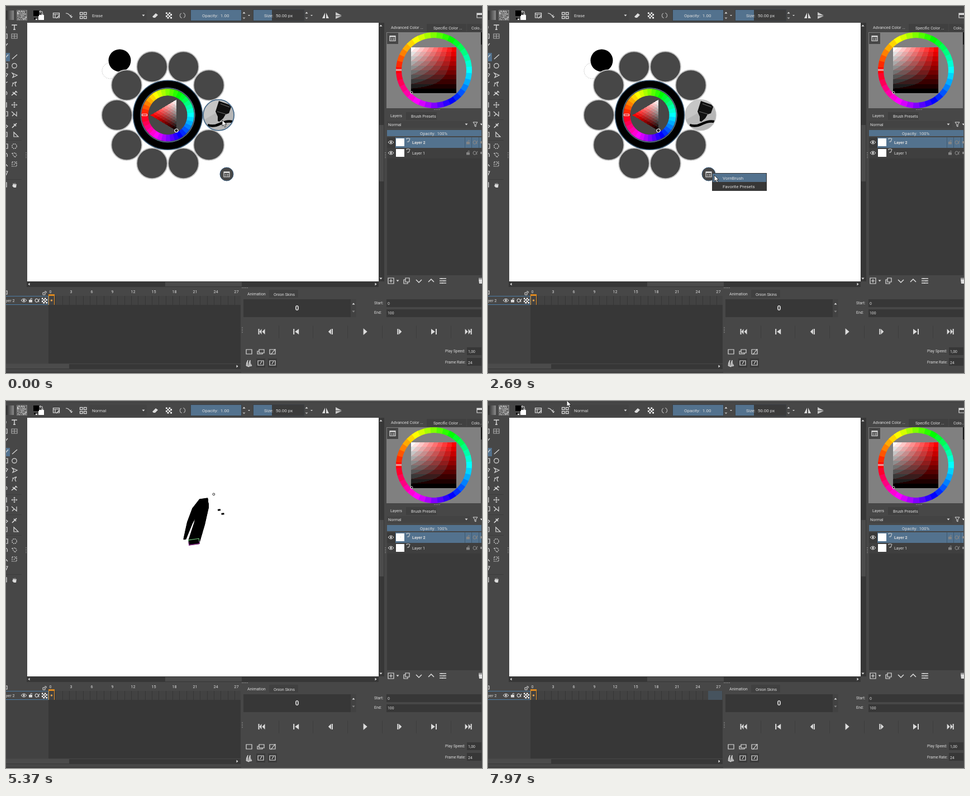
Recreate the animation shown at these times as an HTML page with a canvas. Size 852 by 657 pixels, loop 8000 ms.

```html
<!DOCTYPE html>
<html lang="en">
<head>
<meta charset="utf-8">
<title>Brush palette demo</title>
<style>
html, body { margin: 0; width: 100%; height: 100%; overflow: hidden; background: #474747 }
canvas { display: block }
</style>
</head>
<body>
<canvas id="stage" width="852" height="657"></canvas>
<script>
const W = 852, H = 657, LOOP = 8000, TAU = Math.PI * 2;
const PANEL = '#474747', DARK = '#373737', BLUE = '#53728e', LIGHT = '#dcdcdc', DIM = '#858585';
const stage = document.getElementById('stage').getContext('2d');
let g = stage;

function layer(draw) {
  const canvas = document.createElement('canvas');
  canvas.width = W;
  canvas.height = H;
  g = canvas.getContext('2d');
  draw();
  g = stage;
  return canvas;
}

// Drawing helpers
function box(x, y, w, h, color) {
  g.fillStyle = color;
  g.fillRect(x, y, w, h);
}
function frame(x, y, w, h, color, width = 1) {
  g.strokeStyle = color;
  g.lineWidth = width;
  g.strokeRect(x, y, w, h);
}
function disc(x, y, r, fill, stroke, width = 1) {
  g.beginPath();
  g.arc(x, y, r, 0, TAU);
  if (fill) { g.fillStyle = fill; g.fill(); }
  if (stroke) { g.strokeStyle = stroke; g.lineWidth = width; g.stroke(); }
}
function shape(d, x, y, fill, stroke, width = 1.2) {
  const path = new Path2D(d);
  g.save();
  g.translate(x, y);
  if (fill) { g.fillStyle = fill; g.fill(path); }
  if (stroke) { g.strokeStyle = stroke; g.lineWidth = width; g.stroke(path); }
  g.restore();
}
const solid = (d, x, y, color = LIGHT) => shape(d, x, y, color);
const outline = (d, x, y, color = LIGHT, width) => shape(d, x, y, null, color, width);
function text(str, x, y, size = 7.2, { color = LIGHT, align = 'left', weight = 400 } = {}) {
  g.font = `${weight} ${size}px Roboto, sans-serif`;
  g.fillStyle = color;
  g.textAlign = align;
  g.fillText(str, x, y);
}

// Icons, all centred on their position
const UP = 'M-2.5 1.5H2.5L0-1.5Z', DOWN = 'M-2.5-1.5H2.5L0 1.5Z';
const LEFT = 'M1.5-2.5V2.5L-1.5 0Z', RIGHT = 'M-1.5-2.5V2.5L1.5 0Z';
const SQUARE = 'M-5-4H5V4H-5Z';
function listIcon(x, y) {
  outline('M-5-4.5H5V4.5H-5Z', x, y);
  box(x - 5, y - 5, 10, 2.5, LIGHT);
  outline('M-3 0H-1M0 0H3.5M-3 2.5H-1M0 2.5H3.5', x, y);
}
function checker(x, y, size) {
  const cell = size / 4;
  for (let i = 0; i < 16; i++) {
    const col = i % 4, row = i >> 2;
    box(x - size / 2 + col * cell, y - size / 2 + row * cell, cell, cell, (col + row) % 2 ? '#555' : '#fff');
  }
}
function eye(x, y) {
  shape('M-5 0Q0-6 5 0Q0 6-5 0Z', x, y, null, LIGHT, 1);
  disc(x, y, 1.8, LIGHT);
}
function lock(x, y, color) {
  box(x - 3, y - 1, 6, 4.5, color);
  outline('M0-1V-3Q2-5 3-2', x, y, color, 1);
}
const alpha = (x, y, color) => outline('M4-3Q1 4-2 3Q-4 2-4 0Q-3-3-1-3Q1-3 3 3', x, y, color, 1.1);

// Colour selectors: hue runs clockwise from red at the left
function hueRing(x, y, inner, outer, count) {
  const step = TAU / count;
  for (let i = 0; i < count; i++) {
    const mid = Math.PI + i * step;
    g.beginPath();
    g.arc(x, y, (inner + outer) / 2, mid - step / 2 - .01, mid + step / 2 + .01);
    g.strokeStyle = `hsl(${i * 360 / count} 100% 50%)`;
    g.lineWidth = outer - inner;
    g.stroke();
  }
}
// Ten-level shades of red; each channel is quantized on its own
const level = n => 255 * Math.min(9, Math.floor(n * 10)) / 9;
function shadePixel(x, y, red, low) {
  box(x, y, 1, 1, `rgb(${level(red)} ${level(low)} ${level(low)})`);
}
function shadeSquare(x, y, w, h) {
  for (let py = 0; py < h; py++) for (let px = 0; px < w; px++) {
    const value = 1 - (py + .5) / h;
    shadePixel(x + px, y + py, value, value * (1 - px / w));
  }
}
function shadeTriangle(x, y, w, h) {
  for (let px = 0; px < w; px++) {
    const half = h / 2 * px / w;
    for (let py = -Math.floor(half); py <= half; py++) {
      const hue = 1 - px / w;
      const white = (1 - hue) * (half ? .5 - py / half / 2 : .5);
      shadePixel(x + px, y + py, hue + white, white);
    }
  }
}

function drawToolbar() {
  const fade = g.createLinearGradient(0, 0, 14, 0);
  fade.addColorStop(0, '#2a2a2a');
  fade.addColorStop(1, '#8a8a8a');
  box(0, 8, 14, 17, fade);
  let seed = 7;
  for (let i = 0; i < 324; i++) {
    seed = seed * 16807 % 2147483647;
    const v = 50 + seed % 160;
    box(20 + i % 18, 8 + Math.floor(i / 18), 1, 1, `rgb(${v} ${v} ${v})`);
  }
  frame(19.5, 7.5, 18, 18, '#777');
  box(58, 16, 10, 9, '#fff');
  box(49, 8, 10, 10, '#000');
  outline('M-3-3H2V3M0 1L2 3L4 1M-1-5L-3-3L-1-1', 63, 13, LIGHT, 1);
  box(50, 21, 3, 3, '#111');
  box(53, 23, 3, 2, '#eee');

  outline('M-5.5-4.5H5.5V4H-5.5ZM-5.5-2H5.5M-2-2V4M0 5L5 0', 90, 17);
  outline('M-6-3Q-1-3 2 2L4 0', 113, 16);
  solid(DOWN, 117, 20);
  for (const [x, y] of [[132, 11], [139, 11], [132, 18], [139, 18]]) frame(x + .5, y + .5, 4.5, 4, LIGHT, 1.3);
  box(149, 7, 103, 19, '#434343');
  solid(DOWN, 246, 17);
  solid('M-5 2L1-4L5-1L0 4H-3Z', 267, 17);
  checker(291.5, 17, 11);
  outline('M-2-4A4.5 4.5 0 0 0-1 4.5M2 4A4.5 4.5 0 0 0 1-4.5', 316, 17, '#aaa');

  box(330, 6, 91, 21, BLUE);
  text('Opacity:  1.00', 351, 20, 8);
  box(442, 6, 91, 21, '#3b3b3b');
  box(442, 6, 34, 21, BLUE);
  text('Size:  50.00 px', 462, 20, 8);
  for (const x of [330, 442]) frame(x + .5, 6.5, 91, 20, '#3a3f44');
  for (const x of [426, 538]) {
    solid(UP, x, 12);
    solid(DOWN, x, 22, '#aaa');
    solid('M-2-1H2L0 1Z', x + 9, 17);
  }
  solid('M-1-5V5H-6ZM1-5L6 5H1Z', 572, 17);
  solid('M-5-6L6 0H-5ZM-5 1H6L-5 6Z', 595, 17, '#c8c8c8');
  outline(SQUARE, 848, 17);
  box(843, 13, 9, 3, LIGHT);
}

function drawToolbox() {
  box(0, 84, 7, 15, BLUE);
  for (const y of [167, 203, 240, 310]) box(0, y, 28, 1, '#3d3d3d');
  outline('M-4-3V-4H4V-3M0-4V4M-2 4H2', 15, 38, LIGHT, 1.4);
  outline('M-5-4H5V4H-5ZM0-4V4M-5 0H5', 15, 54, '#aaa');
  outline('M-4 4L5-4', 15, 91);
  disc(15, 107, 4.2, null, LIGHT, 1.2);
  outline('M-4-4L5 0L-3 4L-1 0Z', 15, 124);
  outline('M-4 4Q-3-4 4-4M4-4Q-1 0 3 4M-4-2H0', 15, 140);
  outline('M-5 4L3-3M-3-2L1 2M2-4L5-1M0 0L4 4', 15, 156, LIGHT, 1.5);
  outline('M0-5V5M-5 0H5M-1.5-3.5L0-5L1.5-3.5M-1.5 3.5L0 5L1.5 3.5M-3.5-1.5L-5 0L-3.5 1.5M3.5-1.5L5 0L3.5 1.5', 15, 177, LIGHT, 1);
  outline('M-5-4L4 4V-4M-4 4L0 0', 15, 193);
  outline('M-4 4L1-1M-1-3L3 1M1-1L4-4', 15, 214, LIGHT, 1.7);
  outline('M-4-4V4H4Z', 18, 230);
  g.setLineDash([2, 1.3]);
  disc(15, 251, 4.2, null, LIGHT, 1.2);
  outline('M-4-3L2-4L4 0L1 4L-2 0Z', 15, 267);
  outline('M-4-4H4V4H-4ZM-1 1L4-4', 15, 283);
  g.setLineDash([]);
  solid('M-3 0L-2-4L0-1L1-5L2-1L4-3L3 4H-1L-4 1Z', 15, 321);

  const edgeIcons = ['M0-2V2', 'M-3-4H2V4H-3', 'M-3 4L3-3', 'M-3 4L4-4', 'M-4-4H3V4H-4', 'M-4-4L3-1L0 4',
    'M-3 4Q-1-4 3-4', 'M-4-3Q4-4 1 3', 'M-4-4H1V4H-4', 'M-4-4H3V4H-4', 'M-3-3L3 1L0 4', 'M-4-4H2V4H-4Z',
    'M-4-4H3V4H-4', 'M-3-4Q4-4 2 3', 'M-4-4L3 4', 'M-3-3H3L0 4', 'M-3-4H1V4H-3'];
  const rows = [38, 54, 70, 91, 107, 123, 140, 156, 177, 193, 214, 230, 251, 267, 283, 299, 320];
  rows.forEach((y, i) => outline(edgeIcons[i], 0, y));
}

function drawScrollbars() {
  box(38, 30, 629, 463, '#fff');
  box(667, 30, 10, 463, DARK);
  box(668, 213, 8, 101, '#4b4b4b');
  box(37, 493, 630, 10, DARK);
  box(285, 494, 137, 8, '#4b4b4b');
  solid(UP, 671, 35);
  solid(DOWN, 671, 488);
  solid(LEFT, 41, 498);
  solid(RIGHT, 662, 498);
  for (let i = 0; i < 4; i++) {
    box(35, 262 + i * 3, 2, 1, '#888');
    box(678, 262 + i * 3, 2, 1, '#888');
    box(422, 575 + i * 3, 2, 1, '#888');
    box(766 + i * 3, 185, 2, 1, '#888');
    box(422 + i * 3, 504, 2, 1, '#888');
  }
}

function drawColorDocker() {
  box(753, 32, 99, 14, '#404040');
  box(824, 32, 1, 14, PANEL);
  text('Advanced Color ...', 689, 41);
  text('Specific Color ...', 765, 42);
  text('Colo...', 833, 42);
  box(681, 47, 169, 136, '#808080');
  box(682, 48, 20, 20, PANEL);
  listIcon(692, 58);
  box(850, 47, 2, 22, '#111');
  hueRing(766, 115, 58, 68, 36);
  box(698, 113, 10, 3, '#fff');
  box(698, 114, 10, 1, '#c00');
  shadeSquare(725, 74, 81, 82);
  disc(726, 155, 2, null, '#ddd');
}

function drawLayerDocker() {
  box(716, 190, 55, 14, '#404040');
  text('Layers', 688, 199);
  text('Brush Presets', 725, 200);
  box(682, 206, 149, 12, '#434343');
  text('Normal', 684, 215);
  solid(DOWN, 824, 212);
  outline('M-4-4H4L1 0V4L-1 3V0Z', 840, 212, LIGHT, 1);
  solid(DOWN, 851, 212);
  box(682, 222, 169, 11, BLUE);
  text('Opacity:  100%', 765.5, 230.5, 7.5, { align: 'center' });
  box(682, 235, 169, 247, '#3a3a3a');
  box(682, 254, 169, 19, '#3f3f3f');
  box(697, 235, 154, 19, BLUE);
  for (const x of [821, 833, 846]) box(x, 235, 1, 19, '#405a70');
  [244, 263].forEach((y, i) => {
    eye(689, y);
    box(698, y - 7, 15, 14, '#fff');
    outline('M-3-2V-4H2M3-4L1 2H-2', 720, y - 3, LIGHT, 1);
    lock(827, y, DIM);
    alpha(840, y, DIM);
    box(849, y - 2, 3, 4, DIM);
    text(`Layer ${2 - i}`, 727, y + 3, 7.2, { weight: i ? 400 : 700 });
  });

  outline('M-5-5H5V5H-5ZM0-3V3M-3 0H3', 689, 492);
  solid(DOWN, 701, 492);
  outline('M-2-5H5V2H-2ZM-2-2H-5V5H2V2', 717, 492);
  outline('M-5-2L0 3L5-2', 739, 492, LIGHT, 1.5);
  outline('M-5 2L0-3L5 2', 761, 492, LIGHT, 1.5);
  outline('M-6-4H6M-6 0H6M-6 4H6M-2-5V-3M2-1V1M-1 3V5', 782, 492, LIGHT, 1.4);
  solid('M-4-3H4V5H-3ZM-4-5H4V-4H-4Z', 850, 492);
}

const column = i => 76 + i * 12.33;
function drawTimeline() {
  box(0, 503, 421, 154, PANEL);
  box(76, 519, 344, 121, DARK);
  box(76, 519, 344, 16, '#424242');
  box(0, 536, 76, 104, '#424242');
  for (let i = 0; i < 28; i++) {
    box(Math.round(column(i)), 519, 1, 16, '#363636');
    if (i % 3 === 0) text(i, column(i) + 3.5, 514, 7.2, { align: 'center' });
  }
  outline('M-3-3H2V3H-3', 0, 513);
  outline('M-3-1H1V3H-3ZM0-3H3V0', 69, 514, LIGHT, 1);
  frame(-.5, 519.5, 76, 15, '#4b7ba3');
  text('yer 2', 0, 530);
  eye(32, 527);
  lock(44, 527, LIGHT);
  alpha(56, 527, LIGHT);
  checker(69, 527.5, 10);
  box(76, 516, 11, 3, '#e08a1e');
  box(76, 519, 1, 16, '#e08a1e');
  box(86, 519, 1, 16, '#e08a1e');
  disc(81.5, 527, 1.8, '#e0a050');
  box(0, 641, 420, 9, DARK);
  box(0, 641, 113, 8, '#4b4b4b');
  solid(RIGHT, 414, 645);
  box(0, 655, 421, 2, '#3c3c3c');
}

function drawAnimationDocker() {
  box(471, 508, 52, 14, '#404040');
  text('Animation', 432, 517.5);
  text('Onion Skins', 479, 518.5);
  box(425, 525, 192, 32, DARK);
  text('0', 521, 545, 12, { align: 'center', weight: 700 });
  box(617, 525, 10, 32, '#424242');
  solid(UP, 622, 533);
  solid(DOWN, 622, 547, DIM);
  const field = (label, value, x, y, fieldX, top) => {
    text(label, x, y, 6.9);
    box(fieldX, top, 851 - fieldX, 14, DARK);
    text(value, fieldX + 2, y + 1, 6.9);
  };
  field('Start:', '0', 659, 534, 681, 525);
  field('End:', '100', 659, 551, 681, 543);
  field('Play Speed:', '1,00', 786, 620, 825, 611);
  field('Frame Rate:', '24', 786, 640, 825, 630);

  const controls = ['M-6-5H-4V5H-6ZM0-5V5L-4 0ZM6-5V5L1 0Z', 'M-5-5H-3V5H-5ZM5-5V5L-2 0Z', 'M1-5V5L-4 0ZM2-5H4V5H2Z',
    'M-3-6L4 0L-3 6Z', 'M-4-5H-2V5H-4ZM-1-5L4 0L-1 5Z', 'M-5-5L2 0L-5 5ZM3-5H5V5H3Z', 'M-6-5L-1 0L-6 5ZM0-5L4 0L0 5ZM4-5H6V5H4Z'];
  controls.forEach((d, i) => {
    const x = 457.5 + i * 61.7;
    solid(d, x, 583);
    if (i < 6) box(Math.round(x + 30), 572, 1, 23, '#3d3d3d');
  });
  outline(SQUARE, 435, 619);
  outline('M-3-4H6V2H-3ZM-3-1H-6V4H3V2', 456, 619);
  outline(SQUARE + 'M-3 5L5-5', 477, 619);
  shape('M-5 4Q-5-2-2-6Q-4 2 0 6ZM0 5Q-1-2 2-6Q1 0 5 4Z', 435, 640, '#aaa', LIGHT, 1);
  for (const x of [456, 477]) {
    box(x - 8, 631, 16, 16, '#3a3a3a');
    outline(SQUARE + 'M-1 2L2-3', x, 639);
  }
}

const chrome = layer(() => {
  box(0, 0, W, H, PANEL);
  box(0, 2, W, 1, '#414141');
  drawToolbar();
  drawToolbox();
  drawScrollbars();
  drawColorDocker();
  drawLayerDocker();
  drawTimeline();
  drawAnimationDocker();
});

const popup = layer(() => {
  const cx = 289.5, cy = 195.3;
  g.setLineDash([1, 2]);
  disc(186, 116, 14, '#fff', '#999');
  g.setLineDash([]);
  disc(203.5, 97.5, 20, '#000');
  for (let i = 0; i < 10; i++) {
    const a = i * TAU / 10;
    disc(cx + 91 * Math.cos(a), cy + 91 * Math.sin(a), 27.4, i ? PANEL : '#c6c6c6', '#c4c4c4', 1.8);
  }
  g.save();
  g.beginPath();
  g.arc(380.5, cy, 27, 0, TAU);
  g.clip();
  solid('M-28 10L28-22V28H-28Z', 380, 195, '#b6b6b6');
  solid('M1-25L24-17L19-3L13-1L9 6L2 12L-1 11L-1 3L-5-6Z', 380, 195, '#111');
  outline('M4-20L20-14M-2-6L15-1', 380, 195, '#666', 1.2);
  outline('M-19 18Q-9 22 3 16T25 12', 380, 195, '#000', 4.5);
  g.restore();

  disc(cx, cy, 62, '#000', '#41607c', 1.5);
  disc(cx, cy, 48.7, PANEL, '#5f88ad');
  hueRing(cx, cy, 35, 47, 36);
  shadeTriangle(258, 195, 47, 56);
  box(243, 193, 10, 4, '#fff');
  box(244, 194, 8, 2, '#d00');
  disc(305, 223, 3, '#000', '#fff', 1.2);
  disc(395, 301, 12, PANEL, '#3c5f80');
  listIcon(395, 301.5);
});

// Motion: keys are [time, ...values], interpolated linearly
function at(keys, t) {
  const i = keys.findIndex(k => k[0] > t);
  if (i < 0) return keys[keys.length - 1].slice(1);
  if (i === 0) return keys[0].slice(1);
  const a = keys[i - 1], b = keys[i], p = (t - a[0]) / (b[0] - a[0]);
  return a.slice(1).map((v, n) => v + (b[n + 1] - v) * p);
}

// Nib position, pressure and tilt
const TILT = -.14;
const strokeKeys = [
  [5160, 320, 247, .25, TILT], [5200, 329, 218, .5, TILT], [5235, 340, 194, .68, TILT], [5265, 354, 178, .8, TILT],
  [5285, 353, 188, 1, TILT], [5325, 346.5, 219, .95, TILT], [5370, 336, 253, 1, TILT], [5465, 372, 166, 1, TILT],
  [5560, 353, 254, 1, TILT], [5650, 395, 187, 1, TILT], [5735, 384, 251, 1, TILT], [5775, 404, 230, .9, .1],
  [5805, 420, 224, .75, 1.1], [5820, 430, 224, .7, 1.6], [5835, 436, 227, .6, 2.3], [5850, 437, 231, .5, 3]];
const eraseLow = [[6480, 336, 256], [6600, 390, 256], [6720, 436, 231], [6780, 424, 214], [6880, 400, 240],
  [6990, 340, 240], [7070, 338, 218], [7230, 402, 214]];
const eraseHigh = [[7320, 318, 248], [7400, 324, 222], [7480, 336, 196], [7560, 352, 176], [7630, 378, 166],
  [7690, 400, 186], [7740, 385, 200], [7800, 348, 198]];
const LEAD = 95;
const cursorKeys = [
  [0, 387, 204], [160, 387, 204], [370, 387, 202], [520, 387, 203], [760, 438, 268], [950, 467, 304],
  [1150, 446, 315], [1350, 424, 313], [1900, 412, 308], [2000, 410, 307], [2300, 407, 306], [2690, 405, 303],
  [3060, 411, 308], [3200, 410, 306], [3600, 388, 212], [3840, 377, 197], [4650, 377, 197], [4800, 381, 195],
  [4930, 388, 202], [5030, 309, 246],
  ...strokeKeys.map(([t, x, y]) => [t - LEAD, x, y]),
  [5850, 434, 229], [6000, 407, 528], [6080, 400, 648], [6290, 336, 261], [6400, 336, 261],
  ...eraseLow, ...eraseHigh, [7960, 141, -1]];

function nib(x, y, scale, tilt, draw) {
  g.save();
  g.translate(x, y);
  g.rotate(tilt);
  g.scale(scale, scale);
  draw();
  g.restore();
}
function erase(keys, t) {
  if (t < keys[0][0]) return;
  g.beginPath();
  for (const [time, x, y] of keys) if (time <= t) g.lineTo(x, y);
  g.lineTo(...at(keys, t));
  g.strokeStyle = '#fff';
  g.lineWidth = 27;
  g.lineCap = g.lineJoin = 'round';
  g.stroke();
}
function drawInk(t) {
  if (t >= 7850) return;
  const dab = (x, y) => nib(x, y, 1, TILT, () => box(-2.5, -1.5, 5, 3, '#000'));
  if (t >= 4800) dab(381.5, 195);
  if (t >= 4930) dab(388, 202);
  for (let s = 5160; s <= Math.min(t, 5850); s++) {
    nib(...at(strokeKeys, s), () => box(-9.5, -4.5, 19, 9, '#000'));
  }
  g.save();
  erase(eraseLow, t);
  erase(eraseHigh, t);
  g.restore();
}
function drawThumbnail(t) {
  const shown = [0, 5060, 6000, 7000, 7230, 7850].filter(time => time <= t).pop();
  g.save();
  g.beginPath();
  g.rect(698, 237, 15, 14);
  g.clip();
  g.translate(700, 240);
  g.scale(.095, .09);
  g.translate(-317, -159);
  drawInk(shown);
  g.restore();
}

function drawRing(x, y) {
  g.setLineDash([3, 1]);
  disc(x, y, 17, null, '#86178a', 1.3);
  g.setLineDash([]);
}
function drawMenu() {
  box(401, 299, 98, 32, DARK);
  box(402, 300, 96, 15, BLUE);
  text('VornBrush', 420, 310.5, 8);
  text('Favorite Presets', 420, 326, 8);
}
function drawCursor(t) {
  const [x, y] = at(cursorKeys, t);
  if (t < 3840 || y > 492 || y < 30) {
    shape('M0 0V11L2.6 8.6L4.6 13L6.6 12L4.6 8H8Z', x, y, '#fff', '#222', .9);
  } else {
    disc(x, y, 1.9, '#fff', '#222', 1);
  }
}

function render(t) {
  g.drawImage(chrome, 0, 0);
  text(t < 4000 ? 'Erase' : 'Normal', 154, 20, 7.7);
  const menuOpen = t >= 2400 && t < 3150;
  if (t < 4000) {
    if (t >= 700 && !menuOpen) {
      const [x, y] = t < 2400 ? at(cursorKeys, t) : [412, 307];
      drawRing(x - 2, y - 1);
    }
    g.drawImage(popup, 0, 0);
    if (t < 600 || t >= 3600) disc(380.5, 195.3, 27.6, null, '#4b6e8e', 1.8);
    if (menuOpen) drawMenu();
  }
  if (t >= 6000) box(394, 519, 25, 16, '#46535e');
  drawInk(t);
  if (t >= 5160 && t < 5850) {
    nib(...at(strokeKeys, t), () => {
      outline('M-9.5 4.5V-4.5H9.5V3', 0, 0, '#7fe08a', 1);
      outline('M-9.5-2V4.5H9.5V0', 0, 0, '#a02aa0', 1);
    });
  }
  drawThumbnail(t);
  drawCursor(t);
}

function tick() {
  render(performance.now() % LOOP);
  requestAnimationFrame(tick);
}
tick();
</script>
</body>
</html>
```
